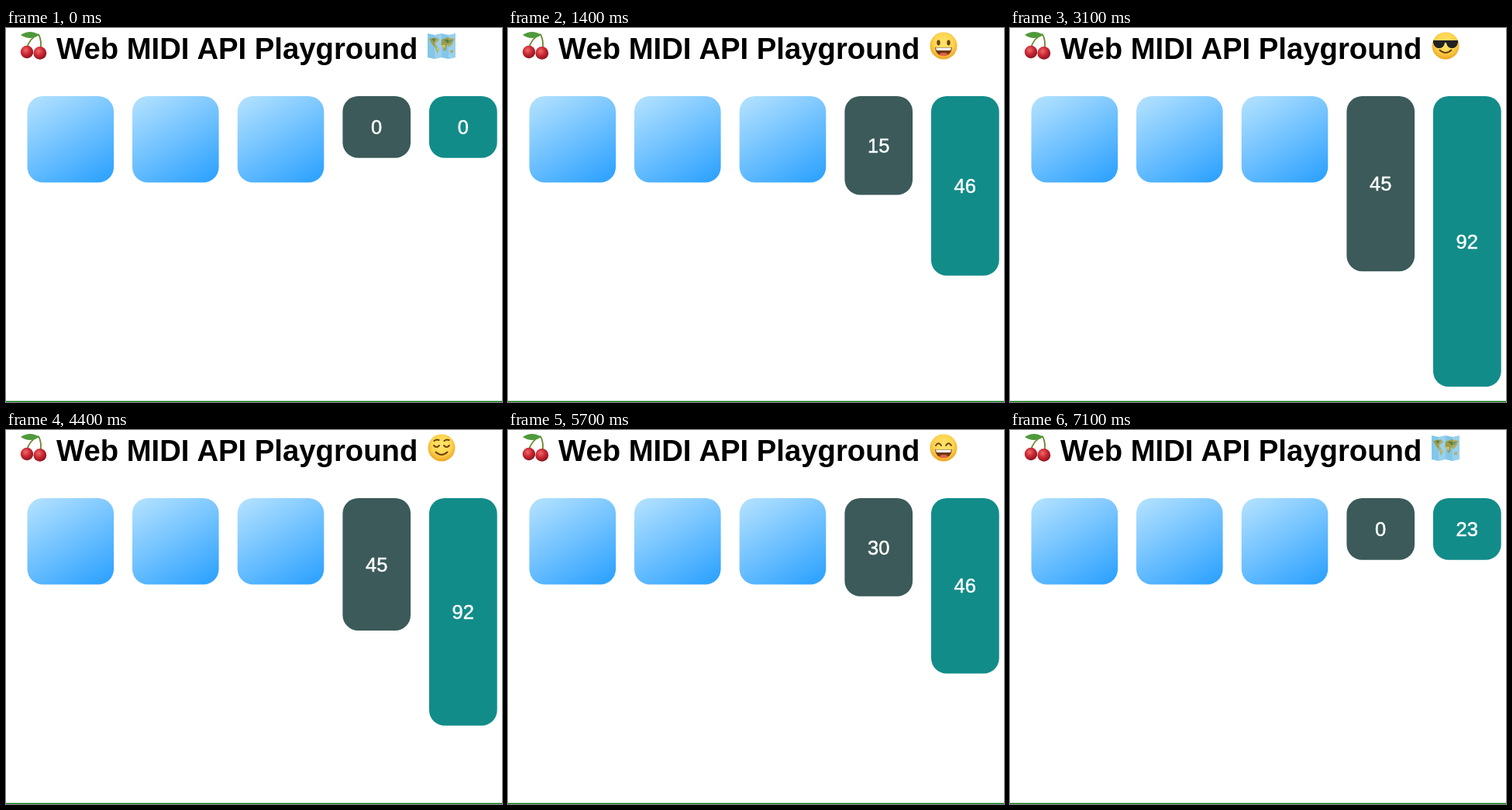
These frames come from a looping animation (640x483 px, 7200 ms). An HTML page:

```html
<!DOCTYPE html>
<html lang="en">
<head>
<meta charset="utf-8">
<title>Web MIDI API Playground</title>
<style>
  html, body { margin: 0; width: 100%; height: 100%; overflow: hidden; background: #fff; }
  svg { display: block; font-family: "Liberation Sans", Arial, sans-serif; }
  .label { font-size: 25.5px; fill: #fff; stroke: #fff; stroke-width: .5; text-anchor: middle; }
  .line { fill: none; stroke: #6b4210; stroke-width: 2; stroke-linecap: round; }
</style>
</head>
<body>
<svg width="640" height="483" viewBox="0 0 640 483">
  <defs>
    <linearGradient id="pad" x1=".2" y1="0" x2=".8" y2="1">
      <stop stop-color="#acdeff"/><stop offset="1" stop-color="#32a4ff"/>
    </linearGradient>
    <radialGradient id="skin" cy=".4" r=".6">
      <stop stop-color="#ffe56b"/><stop offset=".6" stop-color="#fdd550"/><stop offset="1" stop-color="#eea321"/>
    </radialGradient>
    <radialGradient id="imp" cy=".4" r=".6">
      <stop stop-color="#b57be0"/><stop offset="1" stop-color="#7b3fae"/>
    </radialGradient>
    <radialGradient id="cherry" cx=".4" cy=".35" r=".7">
      <stop stop-color="#ee6a68"/><stop offset=".5" stop-color="#cb2733"/><stop offset="1" stop-color="#84101c"/>
    </radialGradient>
    <linearGradient id="sea" x2="0" y2="1">
      <stop stop-color="#5aa5e2"/><stop offset="1" stop-color="#9edcf4"/>
    </linearGradient>
  </defs>
  <rect y="481.7" width="640" height="1.3" fill="#077a12"/>

  <path d="M42 8Q29 14 27 27M42 8Q47 18 44 29" fill="none" stroke="#6f8a35" stroke-width="1.8"/>
  <path d="M43 9Q31 1 19 9Q31 17 43 9Z" fill="#4f9a3c"/>
  <circle cx="27" cy="31" r="8.2" fill="url(#cherry)"/>
  <circle cx="43.8" cy="32.4" r="8.4" fill="url(#cherry)"/>

  <text x="65" y="39.5" font-size="38.28" font-weight="700">Web MIDI <tspan x="246.4">API Playground</tspan></text>
  <g id="emoji" transform="translate(562 23)"></g>
  <g id="pads" fill="url(#pad)"></g>
  <g id="bars"></g>
</svg>
<script>
const $ = id => document.getElementById(id);
const FRAME = 100, FRAMES = 72, EASE_MS = 550, TOP = 88, BASE = 79.75, SCALE = 1.595;

// ---- emoji parts, drawn around (0, 0) ----
const ink = '#6b4210';
const line = (d, extra = '') => `<path class="line" d="${d}" ${extra}/>`;
const fill = (d, color) => `<path d="${d}" fill="${color}"/>`;
const oval = (x, y, rx, ry, color) => `<ellipse cx="${x}" cy="${y}" rx="${rx}" ry="${ry}" fill="${color}"/>`;
const pair = draw => draw(-6.5) + draw(6.5);
const face = (...parts) => oval(0, 0, 17.5, 17.5, 'url(#skin)') + parts.join('');

const dots = pair(x => oval(x, -4, 2.2, 3.4, ink));
const happy = pair(x => line(`M${x - 3.5} -3q3.5 -5.5 7 0`));
const closed = pair(x => line(`M${x - 3.5} -3q3.5 4 7 0`));
const dashes = pair(x => line(`M${x - 3} -3h6`));
const squint = line('M-10 -7l6 3l-6 3M10 -7l-6 3l6 3');
const brows = pair(x => line(`M${x - 3} -9q3 -2.5 6 -1`, 'stroke-width="1.4"'));
const blush = pair(x => oval(x * 1.7, 3, 3.5, 2.5, '#f0906a88'));
const hearts = pair(x => fill(`M${x} 1q-9 -6 -4 -10q3 -1 4 2q1 -3 4 -2q5 4 -4 10`, '#e5323c'));
const smile = line('M-7.5 5.5q7.5 7 15 0');
const flat = line('M-6 7h12');
const frown = line('M-6 9q6 -5 12 -1');
const grin = fill('M-11 2H11Q10 13 0 13T-11 2', '#70380f') + fill('M-10 2.5H10L9 6H-9Z', '#fff')
  + oval(0, 11, 5, 2, '#e8604c');
const teeth = fill('M-11 3H11Q9 12 0 12T-11 3', ink) + fill('M-9.5 4H9.5Q8 11 0 11T-9.5 4', '#fff');
const tear = x => fill(`M${x} 0q-5 7 0 8q5 -1 0 -8`, '#54b6ee');
const halo = '<ellipse cy="-12" rx="16" ry="4.5" fill="none" stroke="#4a9fe0" stroke-width="2.6"/>';
const shades = fill('M-16 -7H16V-4Q14 4 7 3Q2 2 1 -4H-1Q-2 2 -7 3Q-14 4 -16 -4Z', '#222');

const worldMap = fill('M-18 -16L-9 -14L0 -16L9 -14L18 -16V15L9 17L0 15L-9 17L-18 15Z', '#83c6e8')
  + fill('M-16 -9L-6 -11L-3 -8L-8 -3L-6 1L-3 4L-6 10L-8 3L-12 -2ZM0 -8L8 -11L17 -9L14 -2L10 2L7 -2L6 5L3 7L2 1L-1 -1ZM11 6l4 -1v4l-4 0Z', '#9d9c4c')
  + fill('M-13 -9L-6 -10L-9 -5ZM3 -8L15 -8L11 -3L7 -4Z', '#5d7f3c')
  + fill('M-1 -1L5 -1L4 4L2 1ZM-6 2L-4 4L-6 6Z', '#d9c35e')
  + fill('M-9 -14L0 -16V15L-9 17ZM9 -14L18 -16V15L9 17Z', '#ffffff2e');
const postcard = color => `<rect x="-19" y="-17" width="38" height="37" rx="1" fill="#d5d9dc"/>
  <rect x="-18.5" y="-17.5" width="37" height="36.5" fill="#fff"/>
  <rect x="-16" y="-15" width="32" height="31.5" fill="${color}"/>`;
const japan = postcard('url(#sea)')
  + fill('M5 -13l3 3l4 0l-3 3l-3 1l-2 -2ZM5 -5l2 2l-1 6l-4 3l-7 2l-1 -2l6 -3l4 -4ZM-8 9l3 1l-1 5l-3 -2ZM-4 10l4 -1l-2 3Z', '#38613f');
const mountain = postcard('url(#sea)') + fill('M-16 16.5L-4 -6H4L16 16.5Z', '#4d7196')
  + fill('M-4 -6H4L8 2L4 0L1 4L-3 0L-8 2Z', '#fff');
const tower = fill('M-1 -18H1L3 -4L11 18H6Q0 6 -6 18H-11L-3 -4Z', '#df4b35') + fill('M-4 -3H4V0H-4ZM-7 6H7V8H-7Z', '#f4e9e2');
const statue = '<rect x="-7" y="-17" width="14" height="35" rx="5" fill="#72b5a2"/>';
const stone = '<rect x="-11" y="-17" width="22" height="35" rx="6" fill="#77797b"/>';

const emoji = [
  worldMap, mountain, tower, statue, japan, stone,
  face(dots, grin), face(happy, teeth), face(happy, grin, tear(-14), tear(14)),
  face(dots, grin), face(happy, grin), face(happy, grin, tear(13)), face(squint, grin),
  `<g transform="translate(0 2) scale(.96)">${face(happy, smile)}</g>` + halo,
  fill('M-15 -6L-16 -18L-6 -14ZM15 -6L16 -18L6 -14Z', '#7b3fae') + oval(0, 1, 17, 17, 'url(#imp)')
    + dots + smile + line('M-11 -10l7 3M11 -10l-7 3'),
  face(oval(-6.5, -4, 2.2, 3.4, ink), line('M3 -3q3.5 -5 7 0'), smile),
  face(blush, happy, smile),
  face(happy, smile, fill('M0 8L7 6Q9 14 5 14T0 8', '#e8604c')),
  face(brows, closed, smile), face(hearts, grin), face(smile, shades),
  face(dots, brows, line('M-4 8q7 1 10 -3')), face(dots, flat), face(dashes, flat),
  face(dashes, pair(x => oval(x - 2, -1.5, 1.8, 2, ink)), frown)
];

// ---- pads and bars ----
const box = (x, w, h, extra = '') => `<rect x="${x}" y="${TOP}" width="${w}" height="${h}" rx="20" ${extra}/>`;
$('pads').innerHTML = [27.5, 163, 298.7].map(x => box(x, 111.6, 111.6)).join('');

const bars = [
  { x: 434.4, color: '#3b5a59', step: 15, starts: [300, 1490, 2720] },
  { x: 546, color: '#128c89', step: 23, starts: [10, 905, 1810, 2735] }
];
for (const bar of bars) {
  $('bars').insertAdjacentHTML('beforeend',
    `<g>${box(bar.x, 87.7, BASE, `fill="${bar.color}"`)}<text class="label" x="${bar.x + 43.8}"></text></g>`);
  [bar.rect, bar.label] = $('bars').lastChild.children;
}

// cubic-bezier(.68, -.6, .32, 1.6)
function easeInOutBack(x) {
  if (x >= 1) return 1;
  const curve = (s, a, b) => 3 * (1 - s) ** 2 * s * a + 3 * (1 - s) * s * s * b + s ** 3;
  let lo = 0, hi = 1;
  for (let i = 0; i < 24; i++) {
    const mid = (lo + hi) / 2;
    if (curve(mid, .68, .32) < x) lo = mid; else hi = mid;
  }
  return curve(lo, -.6, 1.6);
}

function drawBar({ rect, label, step, starts }, time) {
  const level = starts.filter(s => s <= time).length;
  const shown = level && level - 1 + easeInOutBack((time - starts[level - 1]) / EASE_MS);
  const height = BASE + Math.max(0, shown * step * 2 * SCALE);
  rect.setAttribute('height', height);
  label.setAttribute('y', TOP + height / 2 + 9.2);
  label.textContent = level * step;
}

let last = -1;
function draw() {
  const frame = Math.floor(performance.now() / FRAME) % FRAMES;
  if (frame !== last) {
    last = frame;
    const time = FRAME * Math.min(frame, FRAMES - frame); // plays forward, then back
    bars.forEach(bar => drawBar(bar, time));
    $('emoji').innerHTML = emoji[Math.floor(time / 150)];
  }
  requestAnimationFrame(draw);
}
draw();
</script>
</body>
</html>
```
